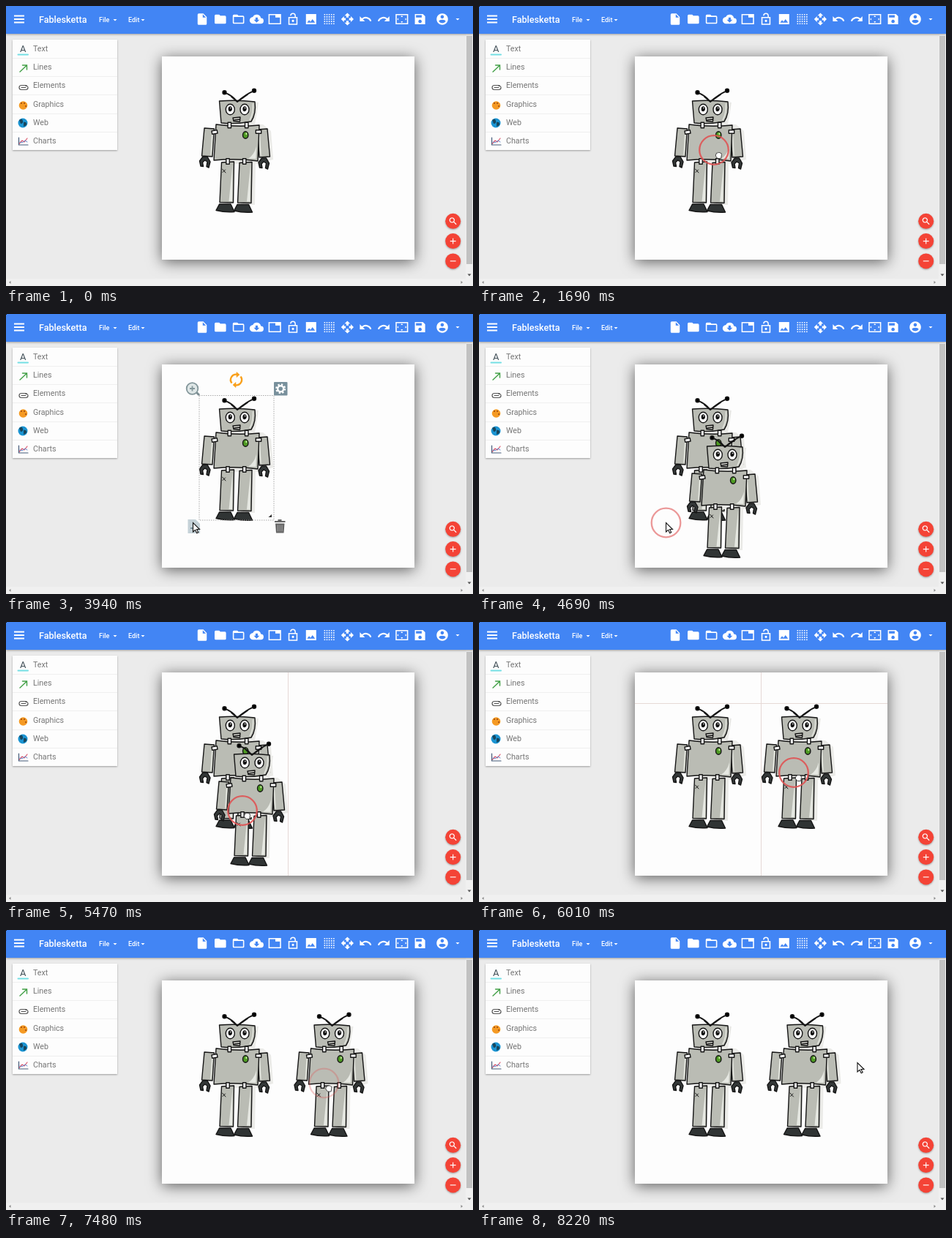
These frames come from a looping animation (638 px wide and 383 px high, 8350 ms). An HTML page:

```html
<!DOCTYPE html>
<html lang="en">
<head>
<meta charset="utf-8">
<title>Drawing editor</title>
<style>
  html, body { margin: 0; width: 100%; height: 100%; overflow: hidden; background: #ebebeb; }
  svg { display: block; width: 638px; height: 383px; font-family: Roboto, sans-serif; }
  .bar { filter: drop-shadow(0 1px 1.5px #0005); }
  .page { filter: drop-shadow(0 3px 10px #0009); }
  .panel { filter: drop-shadow(0 1px 1.2px #0005); }
  .menu { font-size: 10.7px; fill: #757575; }
  .ink { stroke: #151515; stroke-width: 1.4; stroke-linejoin: round; stroke-linecap: round; }
  .line { fill: none; stroke-linecap: round; }
  .guide { stroke: #e6d9d6; fill: none; }
</style>
</head>
<body>
<svg viewBox="0 0 638 383">
  <defs>
    <g id="arm">
      <path d="M271 167L284.500 168L282 206L267.500 205Z" fill="#babcb4"/>
      <path d="M282 171L280 203" stroke="#e4e6df" stroke-width="1.600"/>
    </g>
    <g id="leg">
      <path d="M294.500 214L311.500 213L310.500 269L292 268.500Z" fill="#babcb4"/>
      <path d="M309.500 217L309 267H304.500Z" fill="#e6e8e2" stroke="none"/>
      <path d="M291.500 271H307L312 281.500Q299 282.500 287 279.500Z" fill="#303434"/>
    </g>
    <path id="claw" d="M269 206H275L279 213L277 221L274 219.500L275 213L271.500 211L268.500 214L269.500 219.500L266 219L264.500 212Z" fill="#343838"/>
    <rect id="bolt" x="-2.200" y="-3.700" width="4.400" height="7.400" fill="#fff"/>
    <g id="eye">
      <ellipse rx="6" ry="7.300" fill="#fff"/>
      <ellipse cy="-.8" rx="2" ry="2.800" fill="#111"/>
      <circle cx=".5" cy="-2" r=".8" fill="#fff" stroke="none"/>
    </g>
    <g id="robot">
      <path d="M297 133L345 132L340 162H351L362 171L365 210L350 214L341 216L340 272H321V216H299Z" fill="#ebebe8"/>
      <g class="ink">
        <use href="#arm"/><use href="#arm" transform="matrix(-1 0 0 1 628 1)"/>
        <use href="#claw"/><use href="#claw" x="80.500" y="2"/>
        <use href="#leg"/><use href="#leg" x="24.500" y=".5"/>
        <path d="M287 162Q315 166 346 163L344 212Q315 208 284 211Z" fill="#babcb4"/>
        <path d="M342 192L341.500 209L331 208.500Q339 204 342 192Z" fill="#e6e8e2" stroke="none"/>
        <path d="M291.500 130Q316 128 340 131Q342 147 335 158Q314 162 294 160Z" fill="#babcb4"/>
        <path d="M337.500 134Q338 147 333 156" fill="none" stroke="#e4e6df"/>
        <path d="M298.500 118.300Q309 122 316 131Q327 121 339 115.800M308 124L316 131L330 121" fill="none" stroke-width="1.900"/>
        <circle cx="298.500" cy="118.300" r="2.500"/><circle cx="339" cy="115.800" r="2.500"/>
        <use href="#eye" x="306.300" y="141.500"/><use href="#eye" x="326" y="141.500"/>
        <path d="M310 153L320 152L319.500 158L311 157.500ZM312 156L319 155" fill="#d8d8d2"/>
        <use href="#bolt" x="305.300" y="163"/><use href="#bolt" x="328.700" y="163"/>
        <use href="#bolt" x="303" y="212.500"/><use href="#bolt" x="325.700" y="212.500"/>
        <use href="#bolt" transform="translate(285 172.500) rotate(80)"/><use href="#bolt" transform="translate(345 172) rotate(90)"/>
        <ellipse cx="327.200" cy="176.500" rx="3.700" ry="4.700" fill="#4d9a22"/>
        <ellipse cx="328.300" cy="174.800" rx="1" ry="1.500" fill="#c7eba5" stroke="none"/>
        <path d="M295.500 223L300 228M299.500 224L296 227.500" stroke-width="1"/>
      </g>
    </g>
  </defs>

  <rect width="638" height="383" fill="#ebebeb"/>
  <rect class="page" x="213" y="69" width="345" height="278" fill="#fdfdfd"/>
  <rect x="628" y="38" width="10" height="345" fill="#f0f0f0"/>
  <rect y="373" width="638" height="10" fill="#f0f0f0"/>
  <rect x="629" y="41" width="8" height="312" fill="#c1c1c1"/>
  <path d="M630.500 366.500h5l-2.500 3z" fill="#555"/>
  <path d="M6.500 376v4l-2.500-2zM621.500 376v4l2.500-2z" fill="#8a8a8a"/>

  <rect class="bar" width="638" height="38" fill="#4285f4"/>
  <path d="M11 13.500H25M11 18H25M11 22.500H25" stroke="#fff" stroke-width="1.800"/>
  <g fill="#fff" font-weight="500">
    <text x="45" y="23" font-size="12.600">Fablesketta</text>
    <g font-size="9"><text x="127" y="22">File</text><text x="167" y="22">Edit</text></g>
    <path d="M146.500 18h5l-2.500 2.600zM184.500 18h5l-2.500 2.600zM614.500 17h5l-2.500 2.600z"/>
  </g>
  <g id="tools" fill="#fff" fill-rule="evenodd"></g>

  <rect class="panel" x="9" y="46" width="143" height="151" fill="#fdfdfd"/>
  <g id="menu" class="menu"></g>
  <g class="line" stroke-width="1.400">
    <text x="19" y="63" font-size="13" fill="#46545c" stroke="none">A</text>
    <path d="M16.500 66.500H30" stroke="#74dfe4" stroke-width="2"/>
    <path d="M19 90L28 81.500M22.500 81H28.500V87" stroke="#43a047"/>
    <path d="M28 108.500H21Q18 108.500 18 111.500T21 114.500H27Q30 114.500 30 111.800T27 109.500M27 111.500H21" stroke="#555" stroke-width="1.200"/>
    <circle cx="23.500" cy="136" r="5.800" fill="#f59a23"/>
    <path d="M21 133h.1M25 133h.1M27 137h.1" stroke="#9c4a13" stroke-width="2"/>
    <circle cx="23" cy="160" r="6.500" fill="#1b94d2"/>
    <path d="M18 156Q22 153 23 157T20 161ZM24 159Q29 158 28 163L24 165Z" fill="#17475f"/>
    <path d="M17.500 180V190H30" stroke="#455a78" stroke-width="1.200"/>
    <path d="M18.500 188L22 184L25 186L29 181" stroke="#d9536a" stroke-width="1.200"/>
    <path d="M19 186L22 187L26 184L29 186" stroke="#5c84c9" stroke-width="1"/>
  </g>
  <g id="buttons" class="panel" fill="#fff"></g>

  <use href="#robot"/>
  <use id="copy" href="#robot"/>
  <path id="vline" class="guide" d="M385.500 69V347"/>
  <path id="hline" class="guide" d="M213 111.500H558"/>

  <g id="handles" fill="none">
    <rect x="264" y="111.500" width="102" height="170.500" stroke="#aaa" stroke-dasharray="1.500 1.500"/>
    <path d="M363 274V278H358.500Z" fill="#333"/>
    <path d="M260 107L264 111" stroke="#7b8d92" stroke-width="3"/>
    <g stroke="#84979b" stroke-width="1.800">
      <circle cx="254.500" cy="102" r="7.800" fill="#dfe7e7"/>
      <path d="M251 102H258M254.500 98.500V105.500"/>
    </g>
    <g stroke="#f9a01b" stroke-width="2.400">
      <g id="turn">
        <path d="M308.500 94.500A7.300 7.300 0 0 1 315.500 82.800"/>
        <path d="M315 79.500L319 83L315 86.500Z" fill="#f9a01b" stroke-width=".6"/>
      </g>
      <use href="#turn" transform="rotate(180 314.500 90)"/>
    </g>
    <rect x="366" y="93" width="18.500" height="18.500" rx="1" fill="#78909c"/>
    <g stroke="#fff" stroke-width="2.400">
      <circle cx="375.200" cy="102.200" r="4"/>
      <circle cx="375.200" cy="102.200" r="5.800" stroke-dasharray="2.300 2.255"/>
    </g>
    <path d="M248.500 281H259L265 287V300H248.500Z" fill="#c5d2d8"/>
    <path d="M252 293H261M256.500 288.500V297.500" stroke="#607d8b" stroke-width="1.600"/>
    <path d="M367 283H371.500V281H376.500V283H381.500V285H367ZM368 286.500H380.500L379.500 299.500H369Z" fill="#666"/>
    <path d="M371.500 288.500V297.500M374.200 288.500V297.500M377 288.500V297.500" stroke="#aaa"/>
  </g>

  <g id="pointer">
    <circle id="ring" r="19.800" fill="none" stroke="#df5555" stroke-width="2.300"/>
    <path id="arrow" d="M0 0V12.500L3 9.800L5.200 14.300L7.200 13.300L5 9H9Z" fill="#fff" stroke="#111" stroke-width="1.100"/>
    <path id="hand" d="M3 5.500Q3 3.500 4.700 4.200Q5.500 2.700 6.700 3.700Q8 2.800 8.900 4.200Q10.600 4 10.400 6.500L9.600 11.500H5L2.500 8.500Q2 7 3 5.500Z" fill="#fff" stroke="#333" stroke-width=".9"/>
  </g>
  <rect id="corner" width="1" height="1" fill="#111"/>
</svg>

<script>
const $ = id => document.getElementById(id);

// Icons live on a 24-unit grid.
const icon = (shape, x, y, size = .78) =>
  `<g transform="translate(${x} ${y}) scale(${size}) translate(-12 -12)">${shape}</g>`;
const path = d => `<path d="${d}"/>`;
const turned = (shape, n) => Array.from({ length: n }, (_, i) =>
  `<g transform="rotate(${i * 360 / n} 12 12)">${shape}</g>`).join('');

const folder = 'M10 4H4Q2 4 2 6V18Q2 20 4 20H20Q22 20 22 18V8Q22 6 20 6H12Z';
const undo = path('M2 7V16H11L7.400 12.400A8 8 0 0 1 20 16L22.400 15.200A10.400 10.400 0 0 0 5.600 10.600Z');
const dots = '<path d="M3 4H21M3 8H21M3 12H21M3 16H21M3 20H21" stroke="#fff" stroke-width="2" stroke-dasharray="2 2"/>';
const tools = [
  path('M6 2Q4 2 4 4V20Q4 22 6 22H18Q20 22 20 20V8L14 2ZM13 9V3.500L18.500 9Z'),
  path(folder),
  path(folder + 'M20 18H4V8H20Z'),
  path('M6 20A6 6 0 0 1 5.400 8A7.500 7.500 0 0 1 19.400 10A5 5 0 0 1 19 20ZM17 13L12 18L7 13H10V9H14V13Z'),
  path('M1 3H23V21H1ZM21 19H3V5H13V9H21Z'),
  path('M4 8H15.100V6A3.100 3.100 0 0 0 8.900 6H7A5 5 0 0 1 17 6V8H20V22H4ZM18 20H6V10H18ZM12 13a2 2 0 1 0 .1 0z'),
  path('M3 3H21V21H3ZM8.500 13.500L11 16.500L14.500 12L19 18H5Z'),
  dots,
  turned(path('M12 1L17 6H14V9H10V6H7Z'), 4) + path('M10.500 10.500H13.500V13.500H10.500Z').replace('/>', ' fill="none"/>'),
  undo,
  `<g transform="matrix(-1 0 0 1 24 0)">${undo}</g>`,
  path('M1 3H23V21H1ZM21 19H3V5H21Z') + turned(path('M12 5.500L10 8H14ZM3.500 12L6 10V14Z'), 2),
  path('M3 3H17L21 7V21H3ZM12 13a3 3 0 1 0 .1 0zM15 9H5V5H15Z')
];
const person = path('M12 2a10 10 0 1 0 .1 0zM12 5a3 3 0 1 1-.1 0zM6 16Q7 13 12 13T18 16Q16 19.200 12 19.200T6 16Z');
$('tools').innerHTML = tools.map((s, i) => icon(s, 268 + i * 24.800, 18)).join('') + icon(person, 596, 18);

$('menu').innerHTML = ['Text', 'Lines', 'Elements', 'Graphics', 'Web', 'Charts'].map((s, i) => {
  const y = 62 + i * 25.200;
  return `<text x="37" y="${y}">${s}</text>` + (i < 5 ? `<path d="M9 ${Math.round(y + 9) + .5}H152" stroke="#efefef"/>` : '');
}).join('');

const lens = '<path d="M14 14L20 20M9.500 4A5.500 5.500 0 1 0 9.600 4" fill="none" stroke="#fff" stroke-width="2.200"/>';
$('buttons').innerHTML = [lens, path('M5 11H11V5H13V11H19V13H13V19H11V13H5Z'), path('M5 11H19V13H5Z')].map((s, i) => {
  const y = 294.300 + i * 27.300;
  return `<circle cx="610.700" cy="${y}" r="10.500" fill="#f44336"/>` + icon(s, 610.700, y, .56);
}).join('');

const loop = 8350, beat = 140;
const clamp = v => Math.min(1, Math.max(0, v));
const ease = p => p * p * (3 - 2 * p);

// Reaches 1 in n beats, starting with the first part at once.
const rise = (t, from, n) => clamp(Math.floor((t - from) / beat + 1) / n);

// Each leg runs from one time to another and ends at x, y, moving once per beat.
function glide(t, [x, y], legs) {
  for (const [from, to, endX, endY] of legs) {
    const n = Math.round((to - from) / beat);
    const e = ease(clamp(Math.floor(n * (t - from) / (to - from)) / n));
    x += (endX - x) * e;
    y += (endY - y) * e;
  }
  return [x, y];
}

const travel = [
  [400, 1240, 321, 197],
  [3250, 3940, 255.500, 285.500],
  [4850, 5290, 323, 258],
  [5470, 6010, 430, 206],
  [6010, 6440, 434.500, 209.500],
  [7640, 8220, 517, 181.500]
];
const drag = [[5470, 6010, 122, 0], [6010, 6440, 129.500, 0]];
const press = (t, down, up) => rise(t, down, 2) * (1 - rise(t, up, 3));

const show = (id, on) => $(id).setAttribute('visibility', on ? 'visible' : 'hidden');
const fade = (id, v) => $(id).setAttribute('opacity', v);
const place = (id, [x, y]) => $(id).setAttribute('transform', `translate(${x} ${y})`);

function draw(t) {
  const [x, y] = glide(t, [20, 51], drag);
  const grip = press(t, 1540, 1980) + press(t, 5290, 7250);
  const dragging = t >= 5290 && t < 7480;

  place('pointer', glide(t, [436, 252], travel));
  place('copy', [x, y]);
  show('copy', t >= 4560);
  show('corner', t >= 400);
  show('hand', grip > 0);
  show('arrow', t >= 400 && grip === 0);
  fade('ring', .9 * (grip + press(t, 4440, 4560)));
  fade('handles', t < 4560 ? rise(t, 2730, 3) : 0);

  // Guides mark an edge of the copy on the page's middle, or level tops.
  show('vline', dragging && (x === 20 || x === 122));
  show('hline', dragging && y === 0);
}

const start = performance.now();
function frame() {
  draw((performance.now() - start) % loop);
  requestAnimationFrame(frame);
}
frame();
</script>
</body>
</html>
```
